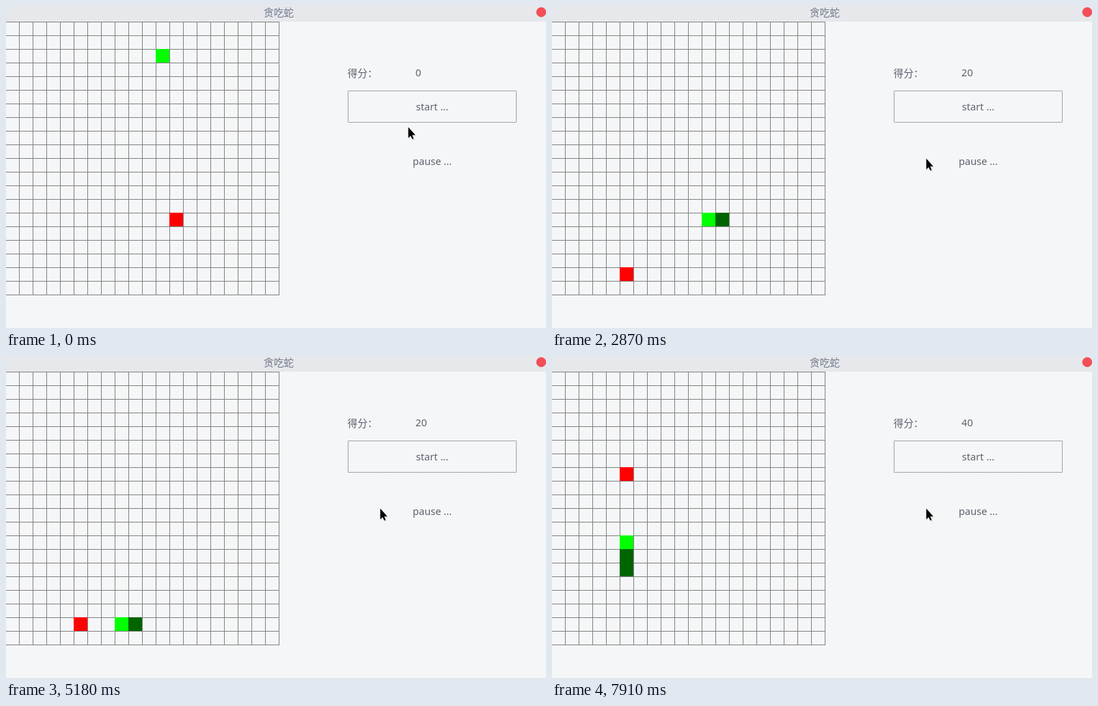
Write an HTML page that moves like this. It is 790x472 px and loops after 8 s.

```html
<!DOCTYPE html>
<html lang="zh">
<head>
<meta charset="utf-8">
<style>
  html, body { margin: 0; width: 100%; height: 100%; overflow: hidden; background: #f5f6f8; }
  svg { display: block; }
  text { font: 14.67px "Noto Sans", "Noto Sans CJK JP", "Noto Sans CJK", sans-serif; fill: #5c616c; }
  .mid { text-anchor: middle; }
</style>
</head>
<body>
<svg width="790" height="472" viewBox="0 0 790 472">
  <rect width="790" height="472" fill="#f5f6f8"/>
  <rect width="790" height="23" fill="#e7e8eb"/>
  <text class="mid" x="399" y="15" style="fill:#70788d">贪吃蛇</text>
  <circle cx="783" cy="9" r="6.8" fill="#f44e58" stroke="#e5434c" stroke-width=".8"/>

  <path id="grid" stroke="#808080" fill="none"/>
  <g id="cells" shape-rendering="crispEdges"></g>

  <text x="499.5" y="104">得分：</text>
  <text id="score" x="599" y="103">0</text>
  <rect x="500.5" y="124.5" width="246" height="46" fill="none" stroke="#4a4d55"
        stroke-dasharray="1 1" stroke-dashoffset=".5"/>
  <text class="mid" x="623.5" y="153">start ...</text>
  <text class="mid" x="623.5" y="233">pause ...</text>

  <g id="cursor">
    <path d="M1 2V18L5 14.5L7.5 20L10 19L7.7 13.5H12Z" fill="#000" opacity=".18"/>
    <path d="M.5 .5V16.5L4 13.2L6.3 18.3L8.5 17.3L6.3 12.2H11Z" fill="#000" stroke="#fff" stroke-width="1.6" paint-order="stroke"/>
  </g>
</svg>
<script>
const LOOP = 8000, TICK = 210, FIRST = 140, FRAME = 70;
const $ = id => document.getElementById(id);
const DIRS = { U: [0, -1], D: [0, 1], L: [-1, 0], R: [1, 0] };
const moves = 'R' + 'D'.repeat(12) + 'LLUUL' + 'D'.repeat(6) + 'LLLLLURRUULUUU';
const foods = [[12, 14], [5, 18], [5, 7]];

// Every state of the game, one per tick; eating keeps the tail.
const states = [{ snake: [[11, 2]], eaten: 0 }];
for (const m of moves) {
  const { snake, eaten } = states[states.length - 1];
  const [dx, dy] = DIRS[m];
  const head = [snake[0][0] + dx, snake[0][1] + dy];
  const ate = String(head) === String(foods[eaten]);
  states.push({
    snake: [head, ...(ate ? snake : snake.slice(0, -1))],
    eaten: eaten + ate
  });
}

let lines = '';
for (let i = 0; i <= 20; i++) {
  lines += `M-1 ${23.5 + 20 * i}H400M${20 * i - .5} 23V424`;
}
$('grid').setAttribute('d', lines);

const cell = ([c, r], color) =>
  `<rect x="${20 * c - 1}" y="${20 * r + 23}" width="20" height="20" fill="${color}"/>`;

function cursorAt(t) {
  if (t < 70) return [588, 177];
  if (t < 1050) return [587, 179];
  const step = Math.floor(t / FRAME) * FRAME;
  const u = Math.min(1, (step - 1050) / 630);
  const e = u * u * (3 - 2 * u);
  return [Math.round(587 - 40 * e), Math.round(181 + 42 * e)];
}

let shown = -1;
function draw(now) {
  const t = now % LOOP;
  const n = Math.min(moves.length, Math.max(0, Math.floor((t - FIRST) / TICK) + 1));
  if (n !== shown) {
    const { snake, eaten } = states[n];
    $('cells').innerHTML = cell(foods[eaten], '#f00') +
      snake.map((p, i) => cell(p, i ? '#006400' : '#0f0')).join('');
    $('score').textContent = eaten * 20;
    shown = n;
  }
  $('cursor').setAttribute('transform', `translate(${cursorAt(t)})`);
  requestAnimationFrame(draw);
}
draw(performance.now());
</script>
</body>
</html>
```
